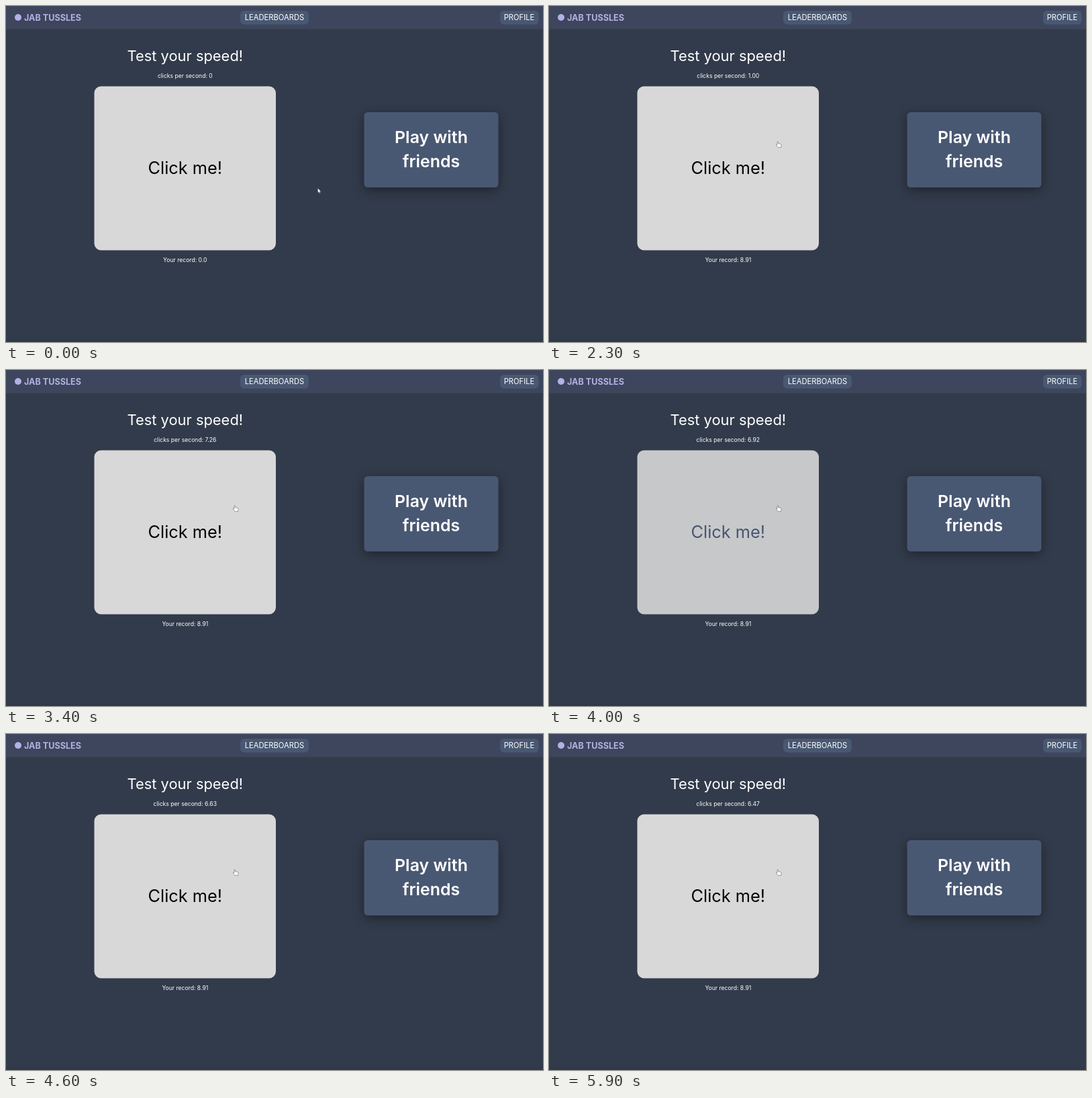
Animation of 800x500 px, one loop 6000 ms. Source, as an HTML page:

```html
<!DOCTYPE html>
<html lang="en">
<head>
<meta charset="utf-8">
<title>Click speed test</title>
<style>
  html, body { margin: 0; width: 100%; height: 100%; overflow: hidden; background: #323b4b; }
  svg { display: block; width: 800px; height: 500px; font-family: Inter, sans-serif; fill: #fff; }
  .center { text-anchor: middle; }
  .button { fill: #495872; }
  .small { font-size: 8.6px; }
  .menu { font-size: 11.2px; }
  .card { font-size: 24.9px; font-weight: 600; }
  .card rect { filter: drop-shadow(0 4px 8px rgba(0, 0, 0, .4)); }
  .brand { font-size: 12.6px; font-weight: 700; fill: #b5b0e6; }
  .cursor { stroke: #444; stroke-width: .5; stroke-linejoin: round; }
</style>
</head>
<body>
<svg viewBox="0 0 800 500">
  <rect width="800" height="34.5" fill="#3d465c"/>
  <rect y="496" width="800" height="4" fill="#303948"/>
  <g class="brand">
    <circle cx="18" cy="17" r="5"/>
    <text x="27" y="21.5">JAB TUSSLES</text>
  </g>
  <g class="center menu">
    <rect class="button" x="349" y="7" width="102" height="20.5" rx="6"/>
    <text x="400" y="21.4">LEADERBOARDS</text>
    <rect class="button" x="736" y="7" width="57.5" height="20.5" rx="6"/>
    <text x="764.5" y="21.4">PROFILE</text>
  </g>
  <g class="center card">
    <rect class="button" x="533.5" y="158" width="200" height="112" rx="5.5"/>
    <text x="633.5" y="204.3">Play with</text>
    <text x="633.5" y="240.3">friends</text>
  </g>
  <g class="center">
    <text x="266.8" y="82" font-size="21.9">Test your speed!</text>
    <text id="speed" class="small" x="266.8" y="107.4"></text>
    <rect id="pad" x="131.5" y="119.5" width="270.5" height="244" rx="10"/>
    <text id="label" x="266.8" y="250" font-size="25.3">Click me!</text>
    <text id="record" class="small" x="266.8" y="381.4"></text>
  </g>
  <path id="arrow" class="cursor" d="M0 0V7L1.6 5.6L2.7 8L3.8 7.5L2.8 5.2H4.8Z"/>
  <path id="hand" class="cursor" d="M0 .6Q.8-.4 1.5.6V3L5.6 4Q6.4 4.3 6.2 5.2L5.4 8.8H1.2L-1.6 5.3Q-1.8 4.2-.8 4.5L0 5.1Z"/>
</svg>
<script>
const LOOP = 6000, STEP = 100;
const $ = id => document.getElementById(id);
const clamp = v => Math.max(0, Math.min(1, v));
const mix = (a, b, k) => a + (b - a) * k;
const rgb = (a, b, k) => `rgb(${a.map((v, i) => Math.round(mix(v, b[i], k)))})`;

// Each round spreads its clicks evenly between [count, ms since first click] points.
function round(start, points) {
  const clicks = [];
  points.slice(1).forEach(([n1, t1], i) => {
    const [n0, t0] = points[i];
    for (let n = n0 + (i ? 1 : 0); n <= n1; n++)
      clicks.push(mix(t0, t1, (n - n0) / (n1 - n0)));
  });
  return { start, clicks };
}
const rounds = [
  round(290, [[1, 0], [8, 1078], [15, 1684]]),
  round(2250, [[1, 0], [8, 1102], [11, 1590], [15, 2262], [23, 3555], [24, 3717]])
];

function state(t) {
  let speed = '0', record = 0, press = 0;
  for (const { start, clicks } of rounds) {
    clicks.forEach((ms, i) => {
      const since = t - start - ms;
      press = Math.max(press, clamp((50 - Math.abs(since + 10)) / 25));
      if (since < 0) return;
      const rate = (i + 1) / Math.max(1, ms / 1000);
      speed = rate.toFixed(2);
      record = Math.max(record, rate);
    });
  }
  return { speed, record: record ? record.toFixed(2) : '0.0', press };
}

function draw(t) {
  const { speed, record, press } = state(t);
  $('speed').textContent = 'clicks per second: ' + speed;
  $('record').textContent = 'Your record: ' + record;
  $('pad').style.fill = rgb([216, 216, 216], [199, 200, 202], press);
  $('label').style.fill = rgb([4, 4, 10], [71, 86, 115], press);

  const travel = 1 - (1 - clamp(t / 300)) ** 2;
  const x = mix(464.5, 340, travel), y = mix(271, 201.6, travel);
  const over = x < 402;
  for (const [id, shown] of [['arrow', !over], ['hand', over]]) {
    $(id).setAttribute('transform', `translate(${x} ${y})`);
    $(id).style.display = shown ? '' : 'none';
  }
}

const begin = performance.now();
function tick() {
  const t = (performance.now() - begin) % LOOP;
  draw(Math.floor(t / STEP) * STEP);
  requestAnimationFrame(tick);
}
tick();
</script>
</body>
</html>
```
